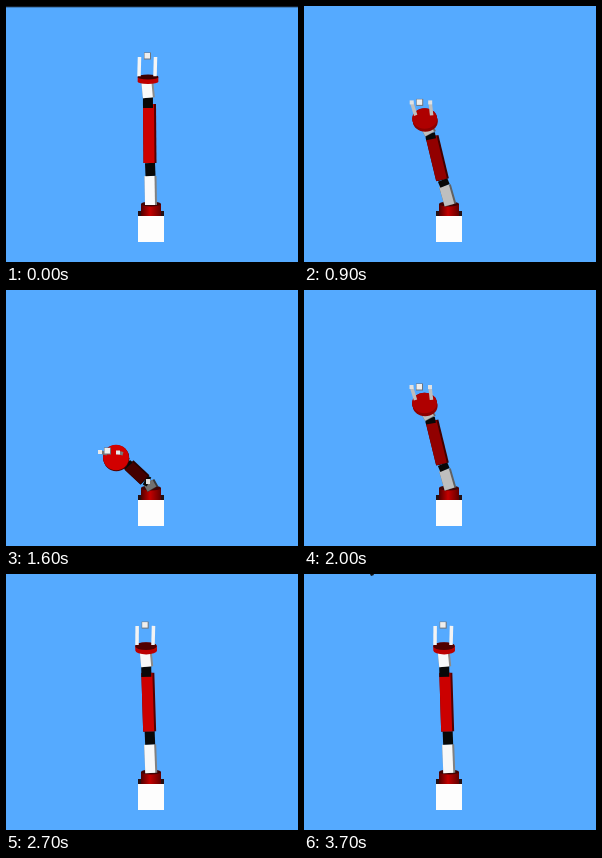
Animation, 292 px wide and 256 px high, one loop 4000 ms. Source, as an HTML page with a canvas:

```html
<!DOCTYPE html>
<html lang="en">
<head>
<meta charset="utf-8">
<title>Robot arm</title>
<style>
html, body { margin: 0; width: 100%; height: 100%; overflow: hidden; background: #55aaff; }
canvas { display: block; width: 292px; height: 256px; }
</style>
</head>
<body>
<canvas width="292" height="256"></canvas>
<script>
const c = document.querySelector('canvas').getContext('2d');

// Lean angle in degrees over time in tenths of a second
const leanKeys = [[0, 0], [5, 0], [11, 71.5], [13, 87], [14, 87], [16, 76], [20, 48], [26, 9], [27, 8], [40, 8]];

// Lean, then x,y of: lower link end, elbow, forearm end, wrist, disc, left tip, right tip, cube
const poses = [
  [0, 144.5, 170, 144, 157, 143.5, 98, 141.5, 77, 142, 71, 133.5, 51, 149.5, 51, 141.5, 50],
  [12, 144, 171, 143.5, 158, 141, 100, 139, 80, 139, 73.5, 130, 53, 146.5, 53, 138, 52.5],
  [48, 141, 180, 138.5, 174, 128, 131, 123, 122, 120.5, 113, 107.5, 97, 126, 97, 115.5, 97],
  [71.5, 142, 189, 138, 188, 122, 168, 115, 162, 111, 158, 95.5, 150, 114, 151, 103, 149],
  [76, 143, 192, 139, 190, 123, 175, 115, 170, 110, 167.5, 94, 162, 112, 162.5, 101.5, 161],
  [87, 144, 196, 139, 194, 124, 190, 115, 188, 109, 187, 91, 183, 110, 183, 99, 181]
];

const rad = d => d * Math.PI / 180;
const mix = (a, b, k) => a + (b - a) * k;
const rgb = (r, g = 0, b = g) => `rgb(${r | 0},${g | 0},${b | 0})`;
const grey = v => rgb(v, v);

function span(keys, v) {
  let i = 0;
  while (i < keys.length - 2 && v >= keys[i + 1][0]) i++;
  return [keys[i], keys[i + 1]];
}

function leanAt(t) {
  const [a, b] = span(leanKeys, t);
  return mix(a[1], b[1], (t - a[0]) / (b[0] - a[0]));
}

// Sideways travel follows the angle, height follows its cosine
function poseAt(lean) {
  const [a, b] = span(poses, lean), cos = d => Math.cos(rad(d));
  const kx = (lean - a[0]) / (b[0] - a[0]);
  const ky = (cos(lean) - cos(a[0])) / (cos(b[0]) - cos(a[0]));
  const points = [];
  for (let i = 1; i < a.length; i += 2)
    points.push([mix(a[i], b[i], kx), mix(a[i + 1], b[i + 1], ky)]);
  return points;
}

function rect(x, y, w, h, color) {
  c.fillStyle = color;
  c.fillRect(x, y, w, h);
}

function oval(x, y, rx, ry, color) {
  c.fillStyle = color;
  c.beginPath();
  c.ellipse(x, y, rx, ry, 0, 0, 7);
  c.fill();
}

function bar([x1, y1], [x2, y2], width, color, shift = 0) {
  c.strokeStyle = color;
  c.lineWidth = width;
  c.beginPath();
  c.moveTo(x1 + shift, y1);
  c.lineTo(x2 + shift, y2);
  c.stroke();
}

// Link with a shaded strip on its right
function link(a, b, width, color, side) {
  bar(a, b, width, side);
  bar(a, b, width - 2, color, -1);
}

function base() {
  rect(132, 205, 26, 6, '#241014');
  const g = c.createLinearGradient(135, 0, 155, 0);
  g.addColorStop(0, '#500000');
  g.addColorStop(.45, '#c40000');
  g.addColorStop(1, '#600000');
  rect(135, 198, 20, 12, g);
  oval(145, 198, 10, 2.5, '#400404');
  rect(132, 210, 26, 26, '#fdfdfd');
}

function arm(lean) {
  const [lower, elbow, fore, wrist, disc, left, right, cube] = poseAt(lean);
  const sin = Math.sin(rad(lean)), cos = Math.cos(rad(lean));
  const light = .12 + .88 * cos;
  const white = grey(70 + 180 * cos), red = rgb(205 * light);
  const joint = [mix(fore[0], wrist[0], .3), mix(fore[1], wrist[1], .3)];
  const dark = '#080808';

  link([145 + 2 * sin, 199], lower, 12, white, grey(110 * light + 20));
  bar(lower, elbow, 10, dark);
  if (lean > 60) rect(lower[0] - 3, lower[1] - 3, 4, 5, '#ddd');
  bar(elbow, [mix(elbow[0], fore[0], .12), mix(elbow[1], fore[1], .12)], 10, dark);
  link(elbow, fore, 13, red, rgb(70 * light + 15));
  bar([fore[0] - 1.5 * cos, fore[1] + 4 * cos], [joint[0] - cos, joint[1] - cos], 10, dark);
  link(joint, wrist, 12, white, grey(120 * light + 20));

  const [x, y] = disc, rx = 10.5 + 2.5 * sin, ry = 2.5 + 10.5 * sin;
  const rim = rgb(170 * light + 20);
  for (let d = 4.5 * cos; d > 0; d--) oval(x + d * sin * .3, y + d, rx, ry, rim);
  oval(x, y, rx, ry, rgb(60 + 155 * sin));

  const finger = grey(80 + 165 * cos), tip = grey(240 - 30 * sin * cos);
  for (const [end, dx] of [[left, -9], [right, 7]]) {
    bar([x + dx, y - .3 * ry], end, 3.5, finger);
    if (lean > 40) rect(end[0] - 2, end[1] - 2, 4, 4, tip);
  }
  rect(cube[0] - 3.5, cube[1] - 3.5, 7, 7, '#70757c');
  rect(cube[0] - 3, cube[1] - 3, 5.5, 5.5, '#eee');
}

function pointer(t) {
  const k = 1 - (1 - (t - 31) / 6) ** 2;
  c.save();
  c.translate(mix(282, 60, k), mix(19, -17, k));
  c.beginPath();
  for (const [x, y] of [[0, 0], [0, 16], [4, 13], [7, 19], [10, 18], [7, 12], [12, 12]]) c.lineTo(x, y);
  c.closePath();
  c.fillStyle = '#111';
  c.fill();
  c.restore();
}

function frame(now) {
  const t = Math.floor(now % 4000 / 100);
  rect(0, 0, 292, 256, '#55aaff');
  if (t < 4) rect(0, 0, 292, 1.3, '#14202e');
  base();
  arm(leanAt(t));
  if (t > 30) pointer(Math.min(t, 37));
  requestAnimationFrame(frame);
}
frame(0);
</script>
</body>
</html>
```
